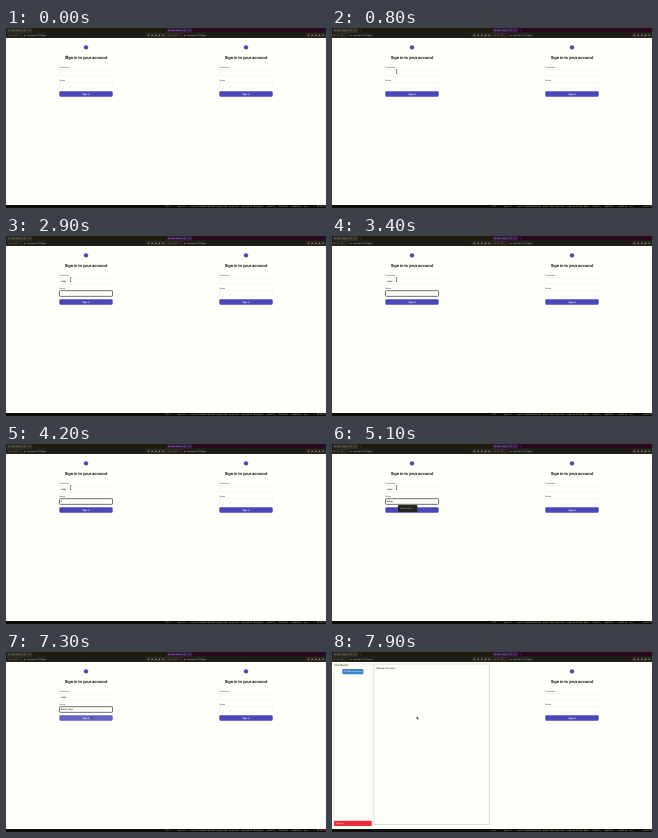
Animation, 320 px wide and 180 px high, one loop 8000 ms. Source, as an HTML page with a canvas:

```html
<!DOCTYPE html>
<html lang="en">
<head>
<meta charset="utf-8">
<title>Sign in</title>
<style>
html, body { margin: 0; width: 100%; height: 100%; overflow: hidden; background: #fffffa; }
canvas { display: block; width: 320px; height: 180px; }
</style>
</head>
<body>
<canvas></canvas>
<script>
// Drawn in 1920 x 1080 desktop pixels, shown at one sixth.
const LOOP = 8000, PAGE = '#fffffa', INK = '#16161c', INDIGO = '#4a48b8';
const canvas = document.querySelector('canvas');
const ctx = canvas.getContext('2d');
const dpr = window.devicePixelRatio || 1;
canvas.width = 320 * dpr;
canvas.height = 180 * dpr;
ctx.scale(dpr / 6, dpr / 6);
ctx.textRendering = 'geometricPrecision';
ctx.textBaseline = 'middle';

function box(x, y, w, h, fill, radius = 0, stroke, line = 1) {
  ctx.beginPath();
  ctx.roundRect(x, y, w, h, radius);
  if (fill) { ctx.fillStyle = fill; ctx.fill(); }
  if (stroke) { ctx.strokeStyle = stroke; ctx.lineWidth = line; ctx.stroke(); }
}

function dot(x, y, r, fill) {
  box(x - r, y - r, 2 * r, 2 * r, fill, r);
}

function text(str, x, y, size = 14, color = INK, weight = 400, align = 'left', spacing = 0) {
  ctx.font = `${weight} ${size}px Inter, sans-serif`;
  ctx.letterSpacing = spacing + 'px';
  ctx.textAlign = align;
  ctx.fillStyle = color;
  ctx.fillText(str, x, y);
}

function chrome(x, strip, tab, path) {
  box(x, 0, 960, 60, '#26261c');
  box(x, 0, 960, 27, strip);
  box(x + 6, 3, 150, 24, tab, 5);
  dot(x + 18, 14, 4, '#8a7cc0');
  text('Vite + React + TS', x + 28, 14, 11, '#b4b4a8');
  text('×', x + 140, 14, 13, '#b4b4a8');
  text('+', x + 166, 14, 13, '#b4b4a8');
  text('←  →  ↻', x + 12, 44, 14, '#a0a094');
  box(x + 98, 32, 740, 23, '#1b1b17', 11);
  dot(x + 113, 44, 4, '#a0a094');
  text('localhost:5173' + path, x + 128, 44, 12, '#c4c4b8');
  for (let i = 0; i < 5; i++) dot(x + 855 + i * 22, 44, 5, i === 3 ? '#d08a3c' : '#8c8c80');
}

function field(y, value, focus) {
  box(321, y, 318, 34, PAGE, 5, focus ? '#26263c' : '#e3e3da', focus ? 4 : 2);
  text(value, 328, y + 17, 13, INK);
}

function login(x, s) {
  ctx.save();
  ctx.translate(x, 0);
  dot(480, 116, 13, INDIGO);
  text('Sign in to your account', 480, 181, 24, INK, 700, 'center', -0.6);
  text('Username', 321, 239, 12, '#4c4c40', 500);
  field(253, s.user, s.focus === 1);
  text('Name', 321, 313, 12, '#4c4c40', 500);
  field(328, s.name, s.focus === 2);
  box(320, 380, 320, 32, s.hover ? '#6364c2' : INDIGO, 5);
  text('Sign in', 480, 396, 14, '#fff', 600, 'center');
  ctx.restore();
}

function menu(x, y, w, h, rows) {
  box(x, y, w, h, '#242420', 6);
  rows.forEach(([str, dy]) => text(str, x + 13, y + dy, 12, '#a9a99c'));
}

function rooms() {
  box(0, 60, 960, 1002, PAGE);
  box(14, 72, 226, 972, null, 0, '#d0d0c6', 2);
  text('Chat Rooms', 13, 82, 15);
  box(62, 102, 126, 32, '#3c86c6', 3);
  text('Create new room', 125, 118, 13, '#eef6ff', 400, 'center');
  box(12, 1012, 226, 32, '#e8303a', 3);
  text('Log out', 22, 1028, 13, '#ffdede');
  box(252, 72, 692, 963, null, 0, '#bdbdb4', 3);
  text('Choose the room', 264, 97, 14);
}

function taskbar() {
  box(0, 1062, 1920, 18, '#0c0c0a');
  const parts = ['1 2 3', 'cpu 12%', 'mem 5.1 GiB', 'disk 84 GiB', 'swap 0 GiB', 'temp 46 C', 'wlan up 72%',
    'eth down', 'vol 40%', 'bat 93%', 'load 0.52', 'en', '14:02:15'];
  const colors = ['#b8b8aa', '#86c060', '#a0a894'];
  parts.forEach((str, i) => text(str, 955 + i * 76, 1071, 13, colors[i % 3]));
}

function pointer(x, y, beam) {
  ctx.save();
  ctx.translate(x, y);
  if (beam) {
    box(-1.5, -12, 3, 24, '#222');
    box(-5, -13, 10, 2, '#222');
    box(-5, 11, 10, 2, '#222');
  } else {
    ctx.beginPath();
    [[0, 0], [0, 18], [4, 14], [8, 21], [11, 19], [8, 13], [13, 13]].forEach(p => ctx.lineTo(...p));
    ctx.closePath();
    ctx.fillStyle = '#111';
    ctx.fill();
    ctx.strokeStyle = '#fff';
    ctx.lineWidth = 1;
    ctx.stroke();
  }
  ctx.restore();
}

const ease = (t, from, to) => {
  const p = Math.min(1, Math.max(0, (t - from) / (to - from)));
  return p * p * (3 - 2 * p);
};
const typed = (str, t, from, step) => str.slice(0, Math.max(0, Math.floor((t - from) / step) + 1));

function draw(t) {
  const inside = t >= 7500;
  const first = ease(t, 100, 700), last = ease(t, 6500, 7200);
  const x = 364 + 24 * first + 120 * last;
  const y = 162 + 100 * first + 124 * last;
  const state = {
    user: typed('robby', t, 2100, 130),
    name: typed('Robby Mosk', t, 4000, 220),
    focus: t < 1000 ? 0 : t < 2900 ? 1 : 2,
    hover: y > 380
  };
  box(0, 0, 1920, 1080, PAGE);
  if (inside) rooms();
  else login(0, state);
  login(960, { user: '', name: '', focus: 0 });
  chrome(0, '#1c1c0a', '#34342a', inside ? '/rooms' : '/login');
  chrome(960, '#2b0822', '#3a2048', '/login');
  taskbar();

  if (t >= 1400 && t < 2200) {
    menu(396, 289, 180, 168, [
      ['robby', 20], ['robby.two', 47], ['second test user', 74],
      ['another test user', 101], ['guest', 126], ['Manage', 154]
    ]);
  }
  if (t >= 4700 && t < 5700) menu(396, 366, 116, 42, [['Robby Mosk', 21]]);
  pointer(x, y, !inside && y > 250 && y < 290);
}

function frame(now) {
  draw(now % LOOP);
  requestAnimationFrame(frame);
}
requestAnimationFrame(frame);
</script>
</body>
</html>
```
